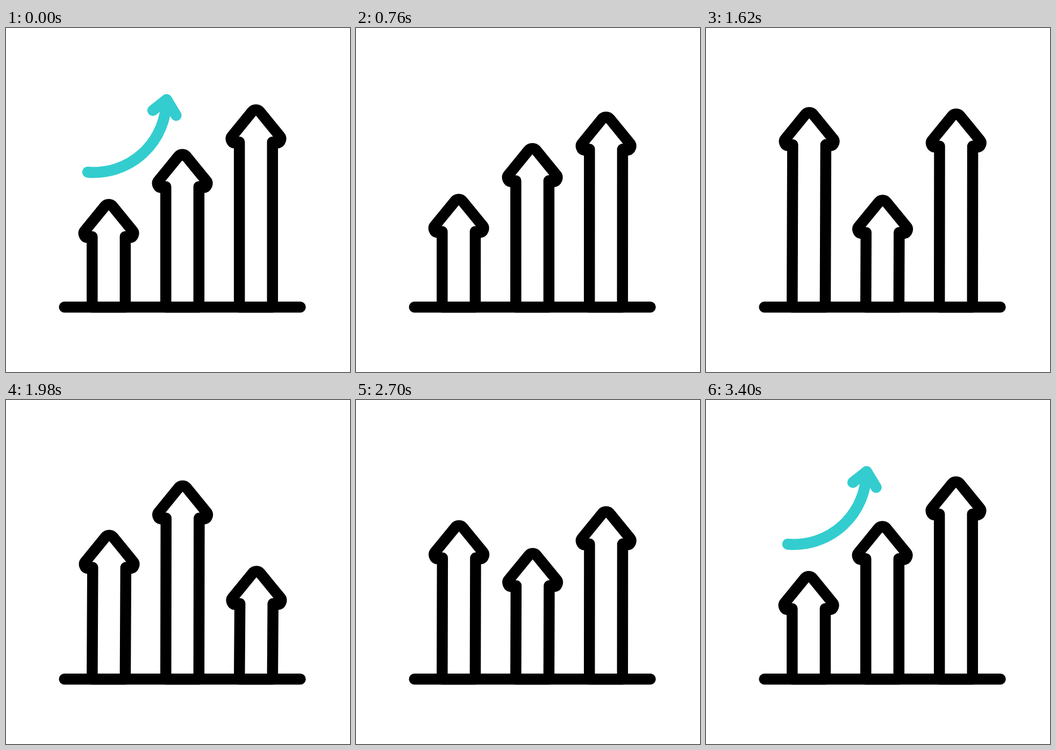
An HTML page for the animation above (3.62 s loop, 640 px wide and 640 px high).

```html
<!DOCTYPE html>
<html lang="en">
<head>
<meta charset="utf-8">
<title>Growth arrows</title>
<style>
  html, body { margin: 0; width: 100%; height: 100%; overflow: hidden; background: #fff; }
  svg { display: block; width: 100vw; height: 100vh; }
  path { fill: none; stroke: #000; stroke-width: 20.5; stroke-linecap: round; stroke-linejoin: round; }
  #trend path { stroke: #33cdcf; }
</style>
</head>
<body>
<svg viewBox="0 0 640 640">
  <g id="trend">
    <path d="M152 268.2A135 135 0 0 0 298.3 133.5"/>
    <path d="M273.2 153.3L298.8 133.2L316.5 162.5"/>
  </g>
  <g id="bars"></g>
  <path d="M108.7 519.3H547.5"/>
</svg>
<script>
const LOOP = 3620;
const LEAVE = 201;   // trend arrow starts to leave
const STEP = 457;    // time between poses
const BASE = 519.3;

// Per bar: centre x, tip height and sideways lean at each pose.
const bars = [
  { x: 191.1, tops: [318, 245, 143.7, 244.5, 144.5, 318], lean: [0, .2, 1, 1, 1, 0] },
  { x: 328.1, tops: [225, 139.5, 315.8, 144.2, 317.5, 225], lean: [0, .2, .5, .5, 1, 0] },
  { x: 465, tops: [142, 245.5, 144.2, 313.8, 244.2, 142], lean: [0, 1, .3, 1, .4, 0] }
];

const group = document.getElementById("bars");
const trend = document.getElementById("trend");
for (const bar of bars) {
  bar.path = document.createElementNS("http://www.w3.org/2000/svg", "path");
  group.append(bar.path);
}

const clamp = (v, lo, hi) => Math.min(hi, Math.max(lo, v));
const ease = u => u * u * (3 - 2 * u);

function valueAt(keys, pos) {
  const i = Math.min(Math.floor(pos), keys.length - 2);
  return keys[i] + (keys[i + 1] - keys[i]) * ease(pos - i);
}

function barPath(x, top, lean) {
  const p = (dx, dy) => `${(x + lean + dx).toFixed(2)} ${(top + dy).toFixed(2)}`;
  return `M${x - 30.8} ${BASE}L${p(-30.8, 70.2)}L${p(-40, 71.8)}` +
    `C${p(-45.5, 71.2)} ${p(-48.1, 63.8)} ${p(-44.6, 59.5)}` +
    `L${p(-7.1, 13.6)}A9.2 9.2 0 0 1 ${p(7.1, 13.6)}L${p(44.6, 59.5)}` +
    `C${p(48.1, 63.8)} ${p(45.5, 71.2)} ${p(40, 71.8)}` +
    `L${p(30.8, 70.2)}L${x + 30.8} ${BASE}Z`;
}

function draw(t) {
  const pos = (t - LEAVE) / STEP;
  const pose = clamp(pos - 1, 0, 5);
  for (const bar of bars) {
    bar.path.setAttribute("d", barPath(bar.x, valueAt(bar.tops, pose), valueAt(bar.lean, pose)));
  }

  // The trend arrow leaves through the top and returns from the left.
  const out = ease(clamp(pos, 0, 1));
  const away = 1 - ease(clamp(pos - 6, 0, 1));
  const [dx, dy] = pos < 3 ? [150 * out, -288 * out] : [-375 * away, 150 * away];
  trend.setAttribute("transform", `translate(${dx.toFixed(2)} ${dy.toFixed(2)})`);
}

const start = performance.now();
function tick() {
  draw((performance.now() - start) % LOOP);
  requestAnimationFrame(tick);
}
tick();
</script>
</body>
</html>
```
